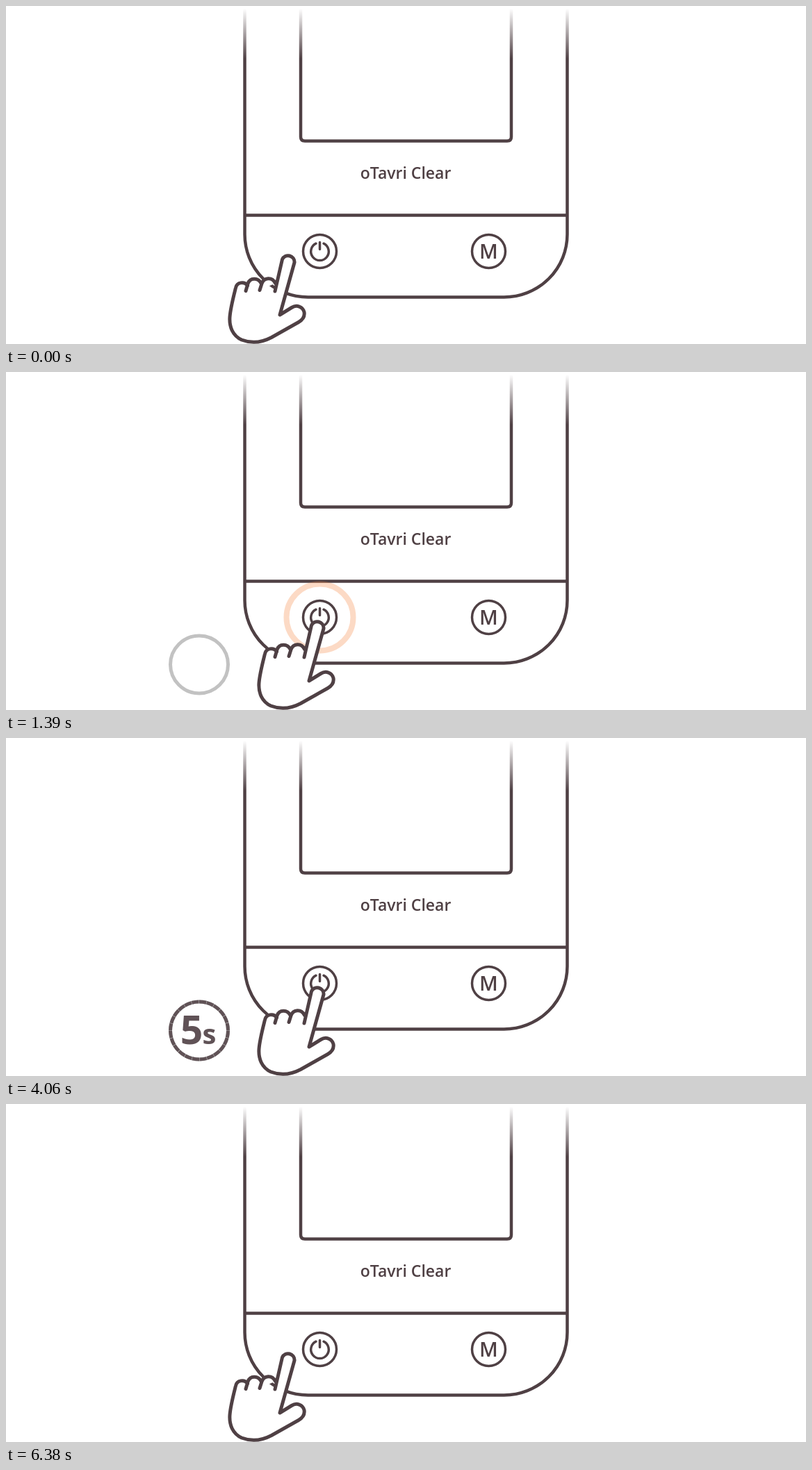
These frames come from a looping animation (1151 px wide and 487 px high, 7.11 s). An HTML page:

```html
<!DOCTYPE html>
<html lang="en">
<head>
<meta charset="utf-8">
<title>Hold the power button for five seconds</title>
<style>
  html, body { margin: 0; width: 100%; height: 100%; overflow: hidden; background: #fff; }
  svg { display: block; width: 100%; height: 100%; }
  text { font-family: "Open Sans", "Noto Sans", sans-serif; fill: #4f4044; text-anchor: middle; }
  .line { fill: none; stroke: #4f4044; stroke-width: 4.5; stroke-linecap: round; stroke-linejoin: round; }
  .thin { stroke-width: 3.5; }
  #hand { fill: #fff; stroke-width: 5; }
  #bubble path { fill: #fff; filter: drop-shadow(2px 4px 5px rgba(0, 0, 0, .12)); }
</style>
</head>
<body>
<svg viewBox="0 0 1151 487">
  <defs>
    <linearGradient id="fade" x2="0" y2="1">
      <stop offset=".05" stop-color="#fff"/>
      <stop offset="1" stop-color="#fff" stop-opacity="0"/>
    </linearGradient>
  </defs>

  <g class="line">
    <path d="M343.5 -5V329A91 90.500 0 0 0 434.500 419.500H716.500A91 90.500 0 0 0 807.500 329V-5M343.500 301.500H807.500"/>
    <path d="M424 -5V188.500Q424 194.500 430 194.500H721Q727 194.500 727 188.500V-5"/>
    <g class="thin">
      <circle cx="451.500" cy="353.500" r="24"/>
      <path d="M446 342.200A12.800 12.800 0 1 0 457 342.200M451.500 340.500V350.500"/>
      <circle cx="694.500" cy="353.500" r="24"/>
    </g>
  </g>
  <rect x="330" width="490" height="76" fill="url(#fade)"/>
  <text x="575" y="249" font-size="23" font-weight="600">oTavri Clear</text>
  <text x="694.500" y="364" font-size="29" font-weight="600">M</text>

  <circle id="pulse" cx="451.500" cy="353.500" fill="none" stroke="#f5833f"/>

  <g id="timer">
    <g fill="none" stroke-width="5" transform="rotate(-90 278 421.500)">
      <circle id="track" cx="278" cy="421.500" r="41.500" stroke="#b8b8b8"/>
      <circle id="progress" cx="278" cy="421.500" r="41.500" stroke="#4f4044" pathLength="240"/>
    </g>
    <g id="count" font-weight="700">
      <text id="digit" x="267" y="441" font-size="57"></text>
      <text x="292.500" y="441" font-size="40">s</text>
    </g>
  </g>

  <path id="hand" class="line" d="M387 411L397.500 365A9.200 9.200 0 0 1 415 369.500L394 445L411 434.500
    C418 430 427 433 429 441C430 447 427 452 421 455.500L382 477.500C366 486 352 486 339 481
    C326 475 321 462 322 448C323 435 327 420 330.500 406C332 398 343 396 347.500 403
    M345 410.500L348 400C351 391 363 391 367 399.500M365 409.500L368 400C371 391 383 390 387.500 399.500"/>

  <g id="bubble">
    <path d="M878 237C834 193 838 118 886 74C938 24 1037 23 1089 74C1140 123 1138 197 1089 244
      C1044 287 970 293 917 266L863 272.500C854 273 850 263 857 256Z"/>
    <text x="985.500" y="197.500" font-size="104" font-weight="600" style="fill:#0072bc">bt</text>
  </g>
</svg>
<script>
  const LOOP = 7110, STEP = 70, TIMER_START = 1408;
  const el = id => document.getElementById(id);
  const ramp = (t, from, to) => Math.min(1, Math.max(0, (t - from) / (to - from)));
  const smooth = x => x * x * (3 - 2 * x);
  // Holds time in 70 ms steps counted from a given moment.
  const held = (t, from) => from + Math.floor((t - from) / STEP) * STEP;
  const set = (id, attrs) => {
    for (const name in attrs) el(id).setAttribute(name, attrs[name]);
  };

  function draw(t) {
    const handTime = held(t, 0);
    const reach = smooth(ramp(handTime, 0, 350)) - smooth(ramp(handTime, 4480, 4830));
    set('hand', { transform: `translate(${42 * reach} 0)` });

    const pulseTime = held(t, 550);
    const radius = 15 + 33 * (pulseTime - 550) / 840;
    set('pulse', {
      r: Math.max(0, radius),
      'stroke-width': Math.max(0, radius / 6),
      opacity: Math.min(ramp(pulseTime, 520, 820), 1 - ramp(pulseTime, 1063, 1530))
    });

    const ticks = Math.floor(24 * ramp(t, TIMER_START, TIMER_START + 2448));
    const second = Math.floor((t - TIMER_START) / 490) + 1;
    set('timer', { opacity: 1 - ramp(held(t, 4060), 4000, 4600) });
    set('track', { opacity: ramp(pulseTime, 463, 1553) });
    set('progress', { 'stroke-dasharray': '9.5 .5 '.repeat(ticks) + '0 240' });
    set('count', { opacity: second > 0 ? 1 : 0 });
    el('digit').textContent = Math.min(5, Math.max(1, second));

    const shown = ramp(held(t, 4480), 4830, 5040) - ramp(held(t, 6240), 6170, 6380);
    set('bubble', { opacity: shown });
  }

  function frame() {
    draw(performance.now() % LOOP);
    requestAnimationFrame(frame);
  }
  frame();
</script>
</body>
</html>
```
